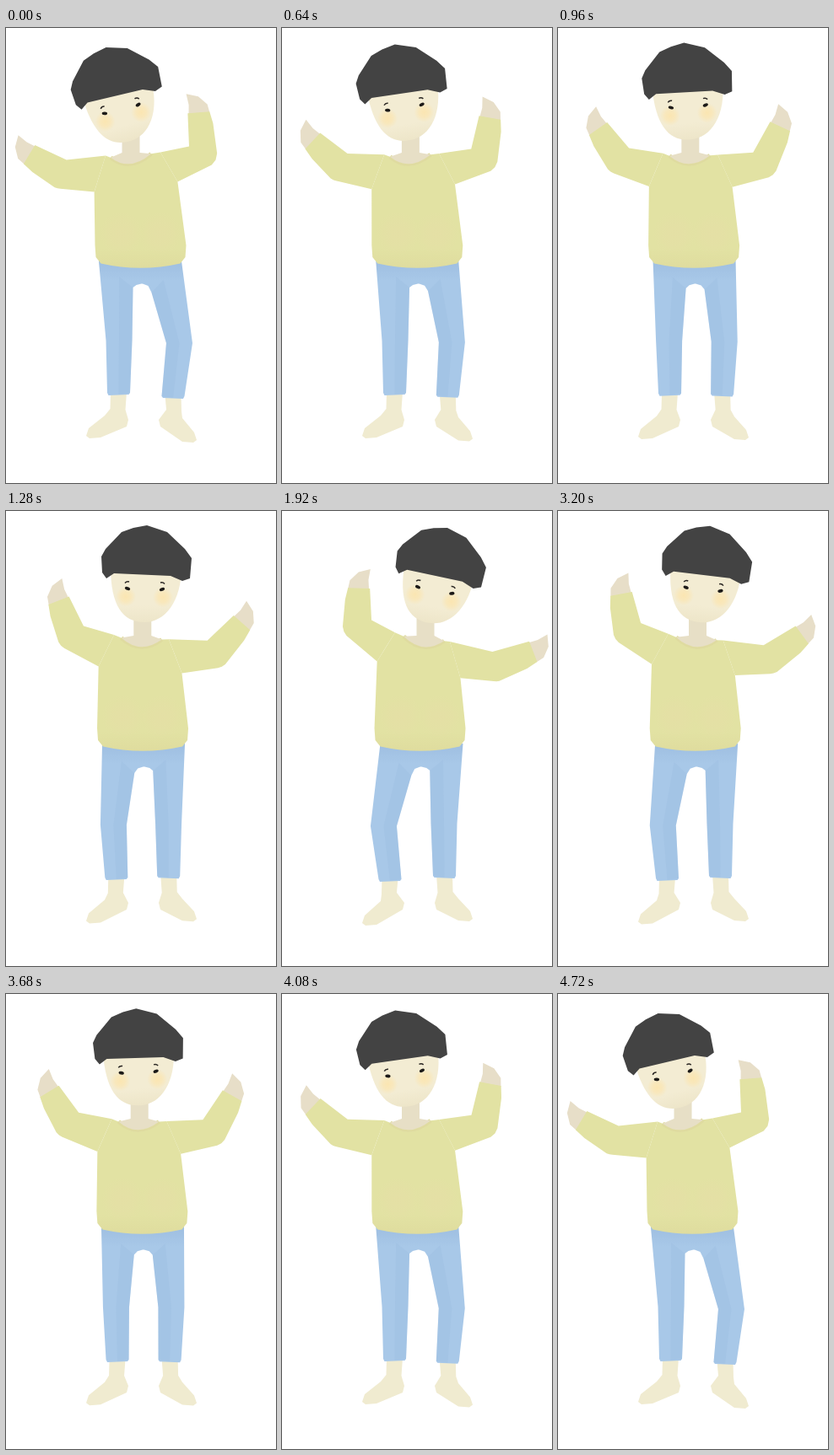
Recreate the animation shown at these times as an HTML page with a canvas. Size 320 by 540 pixels, loop 4800 ms.

```html
<!DOCTYPE html>
<html>
<head>
<meta charset="utf-8">
<style>
  html, body { margin: 0; background: #fff; overflow: hidden; }
  canvas { display: block; }
</style>
</head>
<body>
<canvas id="stage" width="320" height="540"></canvas>
<script>
const ctx = document.getElementById('stage').getContext('2d');
const LOOP = 4800, STEP = 80, RAD = Math.PI / 180;
const SIDES = [-1, 1]; // left and right half of the picture
const SHIRT = '#e2e2a3', HAND = '#e7dec8', FOOT = '#f0ebd0';

let sway = 0; // -1 leaning left, 1 leaning right

const mix = (a, b, k) => a.map((v, i) => v + (b[i] - v) * k);
const toward = (p, angle, r) => [p[0] + r * Math.sin(angle), p[1] - r * Math.cos(angle)];

// A point of a mirrored body that drifts and rolls with the sway.
const body = (side, x, drift, half, y, tilt = 0, roll = 0) =>
  [x + drift * sway + side * half, y + side * (tilt + roll * sway)];
const shoulder = side => body(side, 159.2, 8.7, 32.5, 149.6, 2, 4);
const armpit = side => body(side, 158.4, 4.4, 49.4, 188.4, 2.7, 8.7);
const collar = side => body(side, 159, 11, 24, 151.5, 0.5, 2.7);
const hem = (side, half, y) => body(side, 161.7, 2.2, half, y);
const neck = (side, y) => body(side, 160, 12, 10.5, y);

function fill(points, color) {
  ctx.beginPath();
  points.forEach(p => ctx.lineTo(...p));
  ctx.fillStyle = color;
  ctx.fill();
}

function fade(y0, y1, from, to) {
  const g = ctx.createLinearGradient(0, y0, 0, y1);
  g.addColorStop(0, from);
  g.addColorStop(1, to);
  return g;
}

function glow(x, y, r, rgb, alpha) {
  const g = ctx.createRadialGradient(x, y, 0, x, y, r);
  g.addColorStop(0, `rgba(${rgb},${alpha})`);
  g.addColorStop(0.5, `rgba(${rgb},${alpha * 0.7})`);
  g.addColorStop(1, `rgba(${rgb},0)`);
  ctx.fillStyle = g;
  ctx.fillRect(x - r, y - r, 2 * r, 2 * r);
}

// Only the leg on the unloaded side bends; the other stays straight.
function leg(side) {
  const bend = Math.max(0, side < 0 ? (sway + 0.5) / 1.33 : (0.2 - sway) / 1.2);
  const at = (out, y) => [163 + side * out, y];
  const ankle = 29.5 + 5.5 * bend, cuff = 435 + 4 * bend;
  const knee = 29 + 13.5 * bend, kneeY = 371 + 3 * bend;
  const toe = 62.5 - 2.5 * side, toeY = 475 + 5 * bend;

  fill([at(ankle + 9.5, cuff - 3), at(ankle + 10, 452 + 3 * bend), at(46, 460 + 3 * bend),
    at(toe, toeY), at(toe + 3, toeY + 9), at(toe - 1, toeY + 12), at(toe - 14, toeY + 11),
    at(20, 473), at(18, 465), at(ankle - 8, 453), at(ankle - 9.5, cuff - 3)], FOOT);

  const waist = body(side, 162.5, 3.6, 49, 276);
  const thigh = body(side, 163, 1.5, 11, 308 + 6 * bend);
  const thighTop = body(side, 163, 1.5, 7, 305 + bend);
  const crotch = body(side, 163, 1.5, -1, 303);
  const kneeIn = at(knee - 15.5, kneeY), cuffIn = at(ankle - 13.5, cuff - 2);
  fill([waist, at(knee + 15.5, kneeY), at(ankle + 13.5, cuff - 2), at(ankle + 12, cuff + 1),
    at(ankle - 12, cuff), cuffIn, kneeIn, thigh, thighTop, crotch, [crotch[0], 276]],
    fade(280, 300, '#a0c0e2', '#a8c8e8'));
  fill([thigh, kneeIn, cuffIn, at(ankle, cuff), at(knee, kneeY), mix(waist, thigh, 0.6)],
    'rgba(152,184,222,.3)');
}

function arm(side, fore, length) {
  const top = shoulder(side), pit = armpit(side), root = mix(top, pit, 0.5);
  const bow = 1 - sway * sway, quarter = side * Math.PI / 2;
  const elbow = body(side, 161, 11.4 - 1.6 * side, 81 + 3 * bow, 162 - 2.5 * bow, 7.5, 19.4);
  const upper = Math.atan2(elbow[0] - root[0], root[1] - elbow[1]);
  const at = (along, out) => toward(toward(elbow, fore, along), fore + quarter, out);
  const bend = (k, r) => toward(elbow, upper + (fore - upper) * k + quarter, r);
  const wrist = length;
  fill([at(wrist - 2, -12), at(wrist + 10, -11), at(wrist + 23, -13),
    at(wrist + 19, 1), at(wrist + 9, 11), at(wrist - 1, 13)], HAND);
  fill([top, bend(0.5, -18), at(wrist, -13), at(wrist, 13), at(wrist - 14, 16),
    bend(1, 18), bend(0.65, 17.5), bend(0.3, 17), pit, root], SHIRT);
}

function shirt() {
  const throat = body(0, 157.5, 11, 0, 171);
  const edge = side => [shoulder(side), armpit(side), hem(side, 54, 258),
    hem(side, 53, 272), hem(side, 47, 279.5)];
  ctx.beginPath();
  ctx.moveTo(...collar(-1));
  ctx.quadraticCurveTo(...throat, ...collar(1));
  edge(1).forEach(p => ctx.lineTo(...p));
  ctx.quadraticCurveTo(...hem(0, 0, 290), ...hem(-1, 47, 279.5));
  edge(-1).reverse().forEach(p => ctx.lineTo(...p));
  ctx.fillStyle = fade(262, 285, SHIRT, '#dfdc9e');
  ctx.fill();
  for (const side of SIDES) glow(...hem(side, 23, 244), 26, '232,220,168', 0.4);

  ctx.beginPath();
  ctx.moveTo(...collar(-1));
  ctx.quadraticCurveTo(...throat, ...collar(1));
  ctx.strokeStyle = '#dfdba0';
  ctx.lineWidth = 5;
  ctx.stroke();
  for (const p of [neck(1, 148), neck(1, 126), neck(-1, 126), neck(-1, 148)]) ctx.lineTo(...p);
  ctx.fillStyle = '#e7dfc6';
  ctx.fill();
}

function eye(x, y, side) {
  ctx.beginPath();
  ctx.ellipse(x, y, 3.2, 1.9, -0.3 * side, 0, 7);
  ctx.fillStyle = '#1c1a18';
  ctx.fill();
  ctx.beginPath();
  ctx.moveTo(x - side * 2, y - 8);
  ctx.quadraticCurveTo(x + side, y - 9, x + side * 3, y - 6.5);
  ctx.strokeStyle = '#2a2623';
  ctx.lineWidth = 1.5;
  ctx.stroke();
}

// Drawn upright around the base of the neck, then tilted.
function head() {
  ctx.save();
  ctx.translate(164, 194);
  ctx.rotate(13.8 * (sway - 0.15) * RAD);
  ctx.beginPath();
  ctx.moveTo(-40, -128);
  ctx.bezierCurveTo(-40, -82, -26, -62, 0, -62);
  ctx.bezierCurveTo(24, -62, 44, -86, 44, -128);
  ctx.fillStyle = fade(-82, -61, '#f3ecd3', '#ede5c8');
  ctx.fill();
  for (const side of SIDES) {
    glow(side * 22, -92 + side / 2, 12, '255,226,160', 0.65);
    eye(0.5 + side * 20.5, -101.5 + side / 2, side);
  }
  fill([[-45, -114], [-50, -121], [-51, -140], [-46, -149], [-27, -169], [-13, -174], [3, -177],
    [27, -169], [48, -149], [56, -138], [54, -114], [45, -111], [31, -117], [-36, -120]], '#434343');
  ctx.restore();
}

function draw(time) {
  const now = Math.floor(time % LOOP / STEP) * STEP;
  sway = -Math.cos((now + 35) / LOOP * 2 * Math.PI);
  ctx.fillStyle = '#fff';
  ctx.fillRect(0, 0, 320, 540);
  SIDES.forEach(leg);
  arm(-1, (33 * sway - 26) * RAD, 46);
  arm(1, (40 * sway + 35.5) * RAD, 50);
  shirt();
  head();
}

const start = performance.now();
function tick() {
  draw(performance.now() - start);
  requestAnimationFrame(tick);
}
tick();
</script>
</body>
</html>
```
